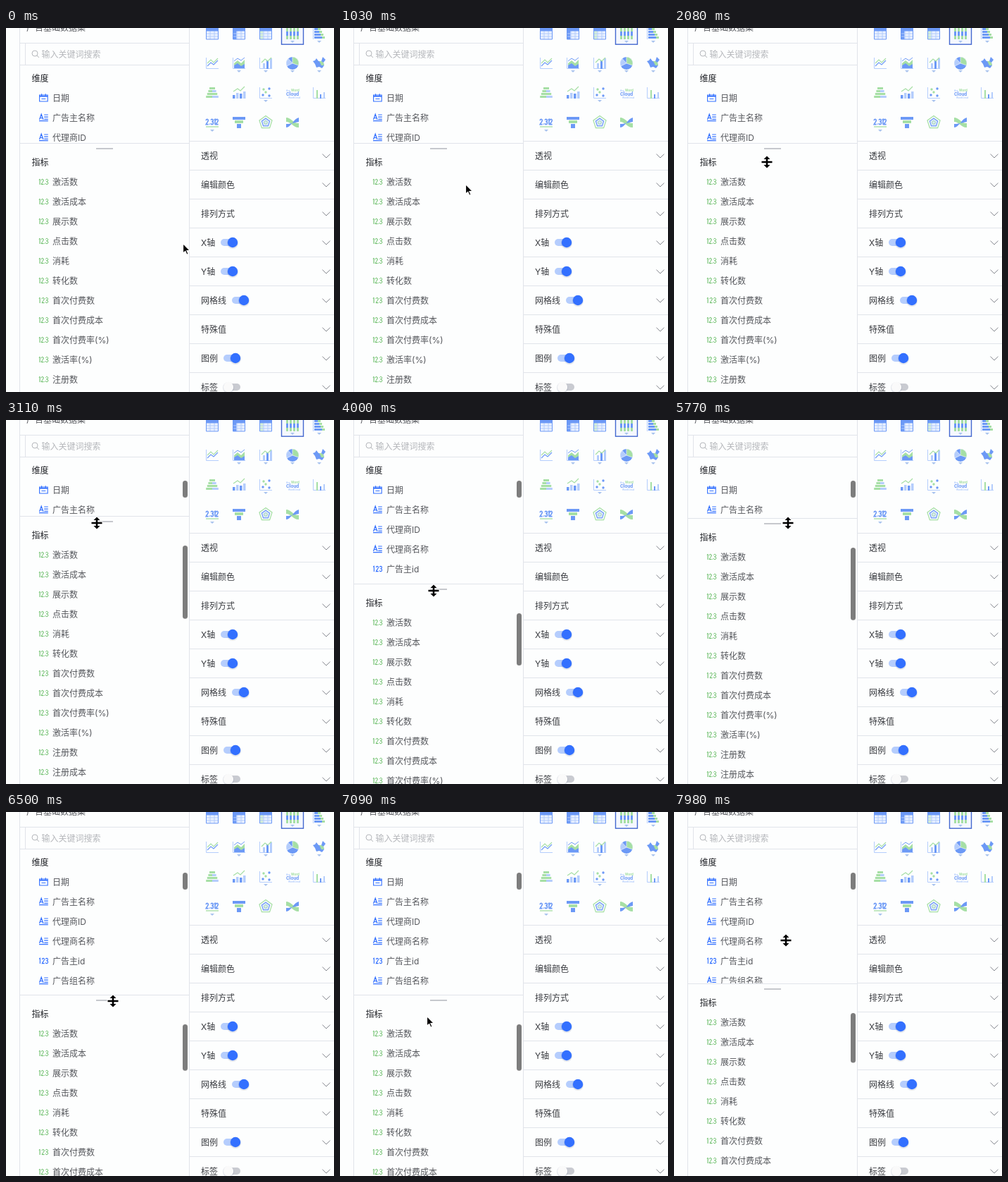
Animation, 466 px wide and 516 px high, one loop 8 s. Source, as an HTML page:

```html
<!DOCTYPE html>
<html lang="zh-CN">
<head>
<meta charset="utf-8">
<title>拖动面板</title>
<style>
html, body { margin: 0; width: 100%; height: 100%; overflow: hidden; background: #fdfefe; }
svg { display: block; width: 466px; height: 516px; }
text { font: 12px Inter, "Noto Sans CJK SC", "Noto Sans CJK", sans-serif; fill: #55575c; }
.head { font-weight: 500; fill: #1f2126; }
.option { fill: #3a3c41; }
.hint { fill: #b5b7bb; }
.line { stroke: #e1e4ea; fill: none; }
</style>
</head>
<body>
<svg id="stage" viewBox="0 0 466 516">
  <defs><clipPath id="cut"><rect id="cutBox" x="21" y="53" width="239" height="110"/></clipPath></defs>
  <g id="page"></g>
  <g clip-path="url(#cut)"><g id="dims"></g></g>
  <g id="metrics"></g>
  <g id="bars" fill="#7d7d7d">
    <rect x="251" y="86" width="7" height="24" rx="3.5"/>
    <rect id="thumb" x="251" width="7" rx="3.5"/>
  </g>
  <g id="arrow"><path d="M.5 .5V14.3L3.7 11.4 5.9 16.3 8.1 15.3 6 10.6H10.4Z" fill="#000" stroke="#fff" stroke-width="1.2"/></g>
  <g id="size">
    <path d="M0 -8.5L4.5 -4H1.3V-1.3H7.5V1.3H1.3V4H4.5L0 8.5 -4.5 4H-1.3V1.3H-7.5V-1.3H-1.3V-4H-4.5Z" fill="#000" stroke="#fff" stroke-width="2" paint-order="stroke"/>
  </g>
  <g id="hand" fill="#fff" stroke="#000" stroke-width="1.2" stroke-linejoin="round">
    <path d="M-2.6 8.4V6L-6.4 1C-7.6 -.8 -5.8 -2 -4.4 -.8L-3 .6 -4.3 -5.7C-4.6 -8.2 -2.1 -8.6 -1.6 -6.3L-.7 -2.6C-.2 -4 1.9 -3.8 2.2 -2.3 2.9 -3.4 4.7 -2.9 4.9 -1.5 5.9 -2.2 7.5 -1.5 7.5 0 7.6 3 6.2 4.7 5.8 6.2V8.4Z"/>
    <path d="M0 1.6V5M2.3 1.6V5M4.5 1.6V5" stroke-width=".9"/>
  </g>
</svg>
<script>
const $ = id => document.getElementById(id);
const BLUE = '#6c99f6', PALE = '#b4cdfc', GREEN = '#a6dfa5', INK = '#3370ff';
const range = n => [...Array(n).keys()];

const rect = (x, y, w, h, fill, rx = 0) =>
  `<rect x="${x}" y="${y}" width="${w}" height="${h}" fill="${fill}" rx="${rx}"/>`;
const path = (d, stroke, width = 1, fill = 'none') =>
  `<path d="${d}" stroke="${stroke}" stroke-width="${width}" fill="${fill}"/>`;
const dot = (x, y, r, fill) => `<circle cx="${x}" cy="${y}" r="${r}" fill="${fill}"/>`;
const label = (x, mid, s, cls = '') => `<text x="${x}" y="${mid + 4.5}" class="${cls}">${s}</text>`;
const line = d => `<path d="${d}" class="line"/>`;
const at = (x, y, body) => `<g transform="translate(${x} ${y})">${body}</g>`;

// Narrow digits, 8 units tall
const DIGITS = {
  1: 'M0 1.3L1.3 .3V8',
  2: 'M.2 2.2C.2 -.2 3.3 -.2 3.3 2 3.3 3.6 1.5 5 .2 7.6H3.6',
  3: 'M.2 1.7C.5 -.2 3.3 -.1 3.3 2 3.3 3.3 2.4 3.8 1.2 3.8 2.6 3.8 3.5 4.5 3.5 5.8 3.5 8.2 .3 8.2 .1 6.2',
  '.': 'M0 7.2H1.1'
};
const digits = (s, xs, color, width = 1) =>
  [...s].map((c, i) => at(xs[i], -4, path(DIGITS[c], color, width))).join('');

const ICONS = {
  real: digits('12.3', [-.2, 2.9, 7.4, 9.3], '#5cb85a'),
  whole: digits('123', [-.2, 3.9, 9.1], '#5cb85a'),
  id: digits('123', [.1, 4.1, 9.1], INK, 1.1),
  date: path('M.6 -4H12.2V5H.6Z', INK, 1.1) + path('M.6 -2.2H12.2', INK, 1.6) +
    path('M3.6 -5.8V-3M9.2 -5.8V-3M3.4 1.5H9.4', INK, 1.2),
  name: path('M.5 3L3.2 -4.8 5.9 3M1.6 .5H4.9M7.2 -4H12.8M7.2 -.8H12.8M7.2 2.4H12.8M0 4.6H12.8', INK, 1.2)
};
const row = (y, [icon, s]) => at(47, y, ICONS[icon]) + label(66, y, s);

const DIMS = [['date', '日期'], ['name', '广告主名称'], ['name', '代理商ID'],
  ['name', '代理商名称'], ['id', '广告主id'], ['name', '广告组名称']];
const METRICS = ['激活数', '激活成本', '展示数', '点击数', '消耗', '转化数', '首次付费数',
  '首次付费成本', '首次付费率(%)', '激活率(%)', '注册数', '注册成本', '注册率(%)', '关注数', '关注成本']
  .map(s => [s === '首次付费数' ? 'whole' : 'real', s]);

// Chart icons, centred on 0,0
const columns = (hs, fills, w = 3, gap = 5) =>
  hs.map((h, i) => rect(i * gap - 9, 8 - h, w, h, fills[i % fills.length])).join('');
const table = (side, top = BLUE) => rect(-8.5, -8, 17, 16, '#eaf1ff') + rect(-8.5, -4, 5, 12, side) +
  path('M-8.5 0H8.5M-8.5 4H8.5M-3 -4V8M3 -4V8', PALE, 1) +
  path('M-8.5 -8H8.5V8H-8.5Z', BLUE, 1) + rect(-9, -8.5, 18, 5, top);
const axes = path('M-8.5 -8V7.5H9', PALE, 1);
const menu = '<path d="M-3 10H3L0 13Z" fill="#a9c3ee"/>';
const star = r => 'M' + range(5).map(i => {
  const a = i * Math.PI * .4;
  return (r * Math.sin(a)).toFixed(1) + ' ' + (-r * Math.cos(a)).toFixed(1);
}).join('L') + 'Z';
const cloudWord = (x, y, s, size, fill) =>
  `<text x="${x}" y="${y}" style="font:bold ${size}px Roboto,sans-serif;fill:${fill}">${s}</text>`;

const CHARTS = [
  table('#eaf1ff'), table(BLUE), table('#d5f0d6'),
  range(4).map(i => rect(i * 5 - 9, -8, 3, 5, GREEN) + rect(i * 5 - 9, -3, 3, 6, BLUE) +
    rect(i * 5 - 9, 3, 3, 5, GREEN)).join('') + menu,
  path('M-8.5 -8V8', PALE) +
    range(4).map(i => rect(-7, i * 4 - 8, 5 + i * 2, 3, BLUE) + rect(-2 + i * 2, i * 4 - 8, 4, 3, GREEN)).join('') + menu,

  axes + path('M-7 4L-2 -1 2 2 8 -4', BLUE, 1.1) + path('M-7 0L-2 -5 2 -1 8 -7', GREEN, 1.1),
  axes + path('M-7 7V0L-2 -4 3 0 8 -5V7Z', 'none', 0, GREEN) + path('M-7 7V3L-2 0 3 4 8 1V7Z', 'none', 0, BLUE) +
    path('M-7 -3L-2 -7 3 -4 8 -8', BLUE, 1) + menu,
  axes + columns([0, 8, 12, 15], [PALE, PALE, BLUE, PALE]) + path('M-6 -1L-1 -6 3 -3 8 -8', GREEN, 1.2) + menu,
  dot(0, 0, 9, BLUE) + path('M0 0V-9A9 9 0 0 1 8.5 3Z', '#fff', .6, GREEN) + path('M0 0L-8 4A9 9 0 0 1 -6 -6.5Z', '#fff', .6, PALE) + menu,
  path('M-9 -3L-6 -4 -4 -7 -1 -3 3 -3 5 -9 9 -5 6 -1 7 3 4 7 0 5 -4 6 -6 1Z', 'none', 0, BLUE) +
    path('M0 -3L3 -3 6 -1 7 3 3 3Z', 'none', 0, GREEN) + menu,

  range(4).map(i => {
    const half = 4 + i * 1.6, y = i * 4 - 8;
    return rect(-half, y, half, 3, GREEN) + rect(0, y, half, 3, i % 2 ? PALE : GREEN);
  }).join(''),
  columns([5, 8, 7, 10], [BLUE, PALE], 3.5) + path('M-8 -2L-2 -6 2 -3 8 -9', GREEN, 1.2),
  axes + [[-4, 3], [0, -1], [5, 4], [-3, -5], [5, -6]].map(([x, y], i) => dot(x, y, 1.7, i % 2 ? GREEN : BLUE)).join('') + menu,
  cloudWord(-9, -2, 'the', 4, PALE) + cloudWord(-2, -2, 'Word', 5, GREEN) + cloudWord(-9, 4, 'Cloud', 7, BLUE) +
    cloudWord(-6, 8, 'WordCloud', 3.5, PALE),
  axes + columns([0, 12, 6, 9], [PALE, GREEN, BLUE, PALE], 2),

  at(-9, -1, digits('2.312', [0, 4.7, 7, 11.7, 14], BLUE, 1.6)) +
    path('M-9 6H9', GREEN, 1.3) + menu,
  rect(-9, -8, 18, 4, BLUE) + rect(-6, -3, 12, 4, GREEN) + rect(-3, 2, 6, 6, BLUE),
  path(star(9.5), GREEN, 1.3) + path(star(6), BLUE, 1.2, '#dbe7ff') + path(star(2.5), GREEN, 1),
  path('M-9 -7C-2 -7 2 2 9 1V7C2 8 -2 -1 -9 -1Z', 'none', 0, GREEN) +
    path('M-9 7C-2 7 2 -6 9 -7V-1C2 0 -2 2 -9 2Z', 'none', 0, BLUE)
];

function toggle(x, y, on) {
  const cx = x + (on ? 17 : 7);
  return rect(x, y - 5, 24, 10, on ? '#b5cdfd' : '#c9cbd1', 5) +
    dot(cx, y + 1, 8, 'rgba(40,60,110,.12)') + dot(cx, y, 7.2, on ? INK : '#fafafa');
}

const OPTIONS = [['透视'], ['编辑颜色'], ['排列方式'], ['X轴', 305, 1], ['Y轴', 305, 1],
  ['网格线', 321, 1], ['特殊值'], ['图例', 309, 1], ['标签', 309, 0]];

$('page').innerHTML =
  line('M19.5 0V516M260.5 0V516M27.5 52V21.5M20 21.5H260M20 52.5H260') +
  label(29, -1, '广告基础数据集') +
  path('M45 36A4 4 0 1 1 37 36 4 4 0 1 1 45 36M44 39L47 42', '#b5b7bb') +
  label(50.5, 37, '输入关键词搜索', 'hint') + label(36.5, 71, '维度', 'head') +
  '<rect x="391.5" y="-10" width="31" height="33.2" fill="#f5f8ff" stroke="#4468cf" stroke-width="1.4"/>' +
  CHARTS.map((c, i) => at(293 + i % 5 * 38, 8 + Math.floor(i / 5) * 42, c)).join('') +
  OPTIONS.map(([s, x, on], i) => {
    const y = 181 + i * 41;
    return line(`M261 ${y - 20.5}H466`) + label(277, y, s, 'option') + (x ? toggle(x, y, on) : '') +
      path(`M449.5 ${y - 2.3}l5.5 5.300 5.500 -5.300`, '#85888f', 1);
  }).join('');
$('dims').innerHTML = DIMS.map((r, i) => row(99 + i * 28, r)).join('');
$('metrics').innerHTML = rect(20, 0, 240, 516, '#fdfefe') + line('M20 .5H260M19.5 0V516') +
  rect(128, 7, 24, 2, '#c6c8cd') + label(36.5, 27, '指标', 'head') +
  METRICS.map((r, i) => row(55 + i * 28, r)).join('');

// step, divider, pointer x, pointer y, pointer shape
const KEYS = [
  [0, 163, 251, 305, 'arrow'], [1, 163, 251, 305, 'arrow'],
  [9, 163, 134, 171, 'size'], [10, 163, 134, 171, 'size'],
  [11, 163, 142, 169, 'size'], [12, 163, 134, 171, 'size'], [13, 163, 134, 171, 'size'],
  [14, 163, 132, 190, 'size'], [17, 163, 118, 270, 'size'], [18, 163, 118, 270, 'size'],
  [19, 136, 128, 146, 'size'], [24, 136, 130, 146, 'size'], [25, 172, 132, 181, 'size'],
  [27, 232, 133, 242, 'size'], [29, 232, 133, 241, 'size'], [30, 232, 137, 239, 'size'],
  [32, 232, 143, 211, 'hand'], [35, 232, 150, 187, 'hand'], [36, 232, 155, 240, 'size'],
  [37, 212, 157, 221, 'size'], [39, 139, 162, 146, 'size'], [40, 135, 162, 143, 'size'],
  [42, 215, 158, 224, 'size'], [44, 259, 152, 268, 'size'], [46, 259, 140, 270, 'size'],
  [47, 259, 128, 280, 'arrow'], [48, 259, 123, 289, 'arrow'], [50, 259, 150, 268, 'size'],
  [51, 190, 154, 199, 'size'], [52, 250, 156, 259, 'size'], [53, 107, 158, 116, 'size'],
  [54, 243, 159, 182, 'size']
];
const LOOP = 8000, STEP = 147.6;

function pose(n) {
  const i = KEYS.findLastIndex(k => k[0] <= n);
  const a = KEYS[i], b = KEYS[i + 1] || a;
  const p = a === b ? 0 : (n - a[0]) / (b[0] - a[0]);
  const mix = j => Math.round(a[j] + (b[j] - a[j]) * p);
  return { split: mix(1), x: mix(2), y: mix(3), kind: a[4] };
}

function draw(ms) {
  const n = Math.min(54, Math.floor(ms / STEP));
  const { split, x, y, kind } = pose(n);
  $('metrics').setAttribute('transform', `translate(0 ${split})`);
  $('cutBox').setAttribute('height', split - 53);
  $('bars').style.display = (n >= 19 && n < 30) || n >= 37 ? '' : 'none';
  $('thumb').setAttribute('y', split + 42);
  $('thumb').setAttribute('height', 74 - (split - 232) * .31);
  for (const id of ['arrow', 'size', 'hand']) {
    $(id).style.display = id === kind ? '' : 'none';
    $(id).setAttribute('transform', `translate(${x} ${y})`);
  }
}

const start = performance.now();
function tick() {
  draw((performance.now() - start) % LOOP);
  requestAnimationFrame(tick);
}
tick();
</script>
</body>
</html>
```
